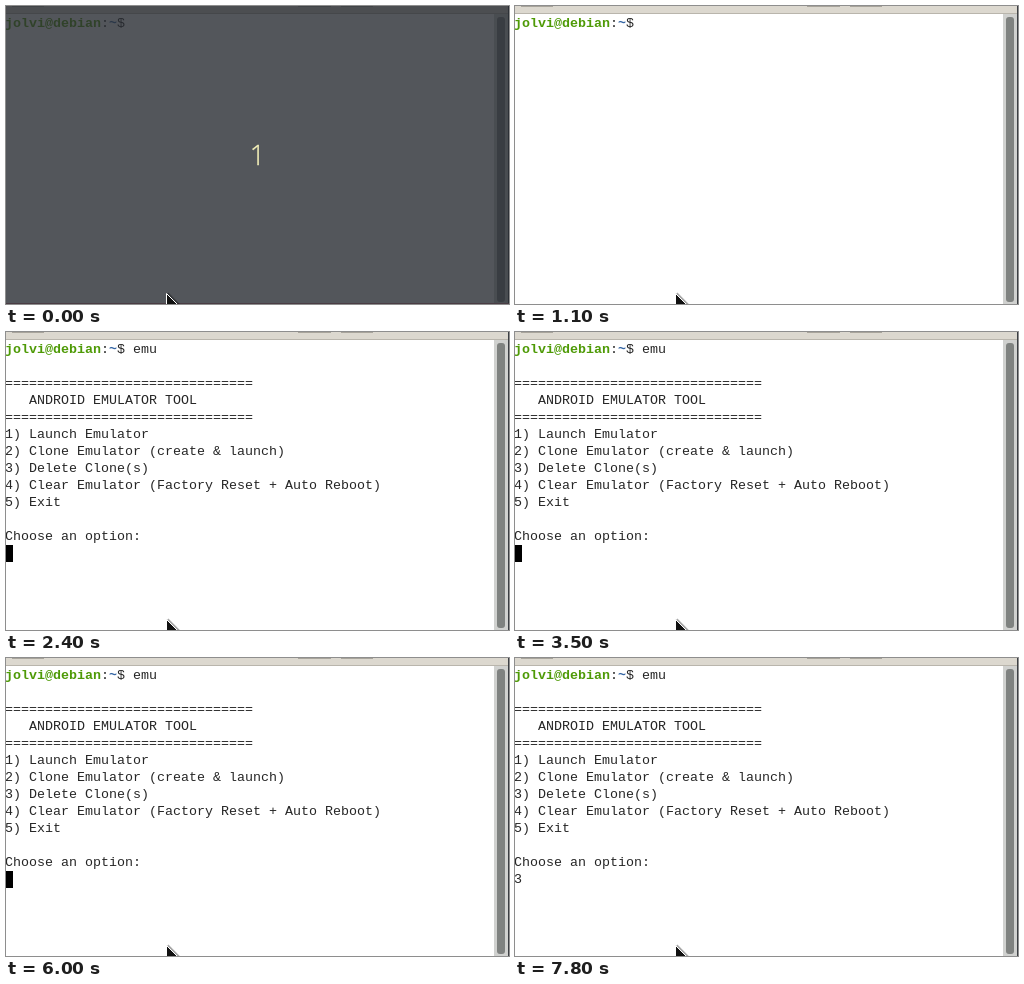
Recreate the animation shown at these times as an HTML page. Size 503 by 298 pixels, loop 8000 ms.

```html
<!DOCTYPE html>
<html lang="en">
<head>
<meta charset="utf-8">
<title>Terminal menu</title>
<style>
  html, body { margin: 0; width: 100%; height: 100%; overflow: hidden; background: #fff; }
  svg { display: block; width: 503px; height: 298px; }
  .term text { font: 13.333px "Liberation Mono", "Courier New", monospace; white-space: pre; fill: #262626; }
  .term .user { font-weight: 700; fill: #4e9a06; }
  .term .path { font-weight: 700; fill: #3465a4; }
  .count { font: 300 27px "Open Sans", sans-serif; fill: #fbf7bd; stroke: #fbf7bd; stroke-width: .3; text-anchor: middle; }
</style>
</head>
<body>
<svg viewBox="0 0 503 298">
  <rect width="503" height="298" fill="#fff"/>
  <rect width="503" height="7" fill="#dcd8cf"/>
  <rect y="7" width="503" height="1" fill="#b9b5ac"/>
  <g fill="#a8a49b">
    <rect x="6" width="32" height="1"/>
    <rect x="292" width="33" height="1"/>
    <rect x="335" width="32" height="1"/>
  </g>
  <rect x="488" y="8" width="14" height="290" fill="#d0d1cf"/>
  <rect x="491" y="11" width="8" height="285" rx="3" fill="#7f8280"/>
  <rect x="502" width="1" height="298" fill="#3c3f44"/>

  <g id="screen" class="term"></g>
  <rect id="caret" width="8" height="17"/>

  <g id="countdown">
    <rect width="503" height="298" fill="#282c33" fill-opacity=".8"/>
    <rect y="297" width="503" height="1" fill="#4a3c44"/>
    <text class="count" x="251.5" y="159">1</text>
  </g>
  <path d="M161.5 287.5L173 299" stroke="#000" stroke-opacity=".35" stroke-width="2.5"/>
  <path d="M160.5 287.5V304L172.5 299.5Z" fill="#111" stroke="#fff"/>
</svg>
<script>
const LOOP = 8000, COL = 8, ROW = 17, LEFT = -1, TOP = 9, BASELINE = 12;
const rule = "=".repeat(31);
const menu = [
  rule, "   ANDROID EMULATOR TOOL", rule,
  "1) Launch Emulator",
  "2) Clone Emulator (create & launch)",
  "3) Delete Clone(s)",
  "4) Clear Emulator (Factory Reset + Auto Reboot)",
  "5) Exit", "", "Choose an option:"
];
const keys = [[1300, "e"], [1500, "m"], [1800, "u"]];
const MENU_AT = 2400, ANSWER_AT = 7300, PROMPT_COLS = 16, MENU_ROW = 2, ANSWER_ROW = 12;
const caretToggles = [500, 1100, 1300, 2300, 2400, 2900, 3500, 4100, 4800, 5400, 6000, 6600, 7200, 7800];

const byId = id => document.getElementById(id);
const screen = byId("screen"), caret = byId("caret"), countdown = byId("countdown");

function put(row, col, text, cls = "") {
  const el = document.createElementNS("http://www.w3.org/2000/svg", "text");
  el.setAttribute("x", LEFT + col * COL);
  el.setAttribute("y", TOP + row * ROW + BASELINE);
  el.setAttribute("class", cls);
  el.textContent = text;
  screen.append(el);
  return el;
}

const show = (el, on) => el.setAttribute("visibility", on ? "visible" : "hidden");

put(0, 0, "jolvi@debian", "user");
put(0, 12, ":");
put(0, 13, "~", "path");
put(0, 14, "$");
const command = put(0, PROMPT_COLS, "");
const menuLines = menu.map((line, i) => put(MENU_ROW + i, 0, line));
const answer = put(ANSWER_ROW, 0, "3");

function render(t) {
  const typed = keys.filter(([at]) => t >= at).map(([, key]) => key).join("");
  const inMenu = t >= MENU_AT, answered = t >= ANSWER_AT;
  command.textContent = typed;
  menuLines.forEach(line => show(line, inMenu));
  show(answer, answered);
  show(countdown, t < 100);

  const col = inMenu ? +answered : PROMPT_COLS + typed.length;
  caret.setAttribute("x", LEFT + col * COL);
  caret.setAttribute("y", TOP + (inMenu ? ANSWER_ROW : 0) * ROW);
  show(caret, caretToggles.filter(at => t >= at).length % 2 === 1);
}

const start = performance.now();
function frame(now) {
  render(Math.max(0, now - start) % LOOP);
  requestAnimationFrame(frame);
}
render(0);
requestAnimationFrame(frame);
</script>
</body>
</html>
```
